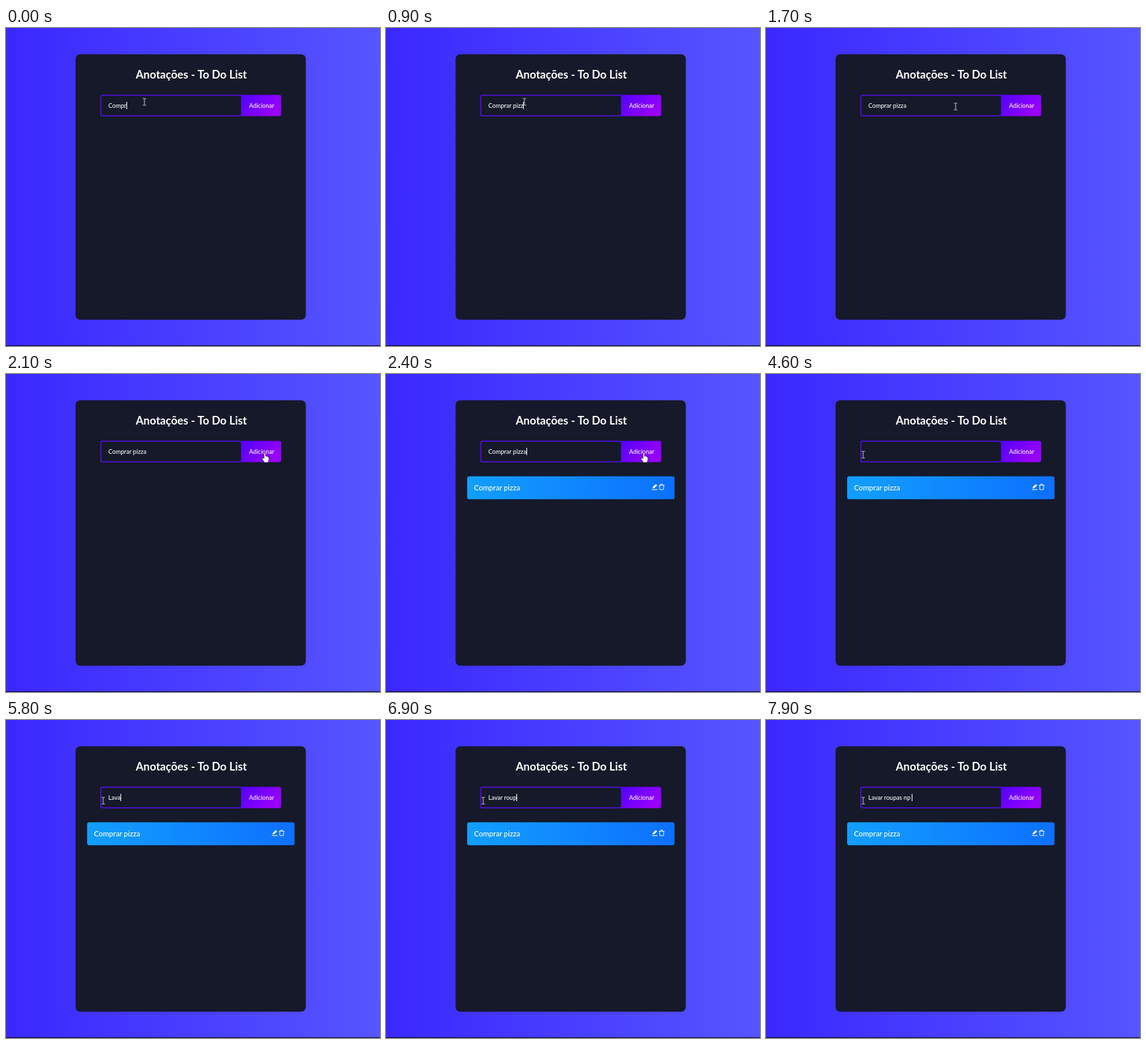
Recreate the animation shown at these times as an HTML page. Size 562 by 478 pixels, loop 8000 ms.

```html
<!DOCTYPE html>
<html lang="pt">
<head>
<meta charset="utf-8">
<title>To Do List</title>
<style>
  html, body { margin: 0; width: 100%; height: 100%; overflow: hidden; background: #3c28ff; }
  svg { display: block; }
  text { font-family: Lato, "Open Sans", sans-serif; font-weight: 500; fill: #fff; white-space: pre; }
</style>
</head>
<body>
<svg width="562" height="478" viewBox="0 0 562 478">
  <defs>
    <linearGradient id="back"><stop stop-color="#3b28ff"/><stop offset="1" stop-color="#5655ff"/></linearGradient>
    <linearGradient id="violet" y2=".5"><stop stop-color="#5200ff"/><stop offset="1" stop-color="#9a00ff"/></linearGradient>
    <linearGradient id="blue"><stop stop-color="#129fff"/><stop offset="1" stop-color="#0d70ff"/></linearGradient>
  </defs>
  <rect width="562" height="478" fill="url(#back)"/>
  <rect y="477" width="562" height="1" fill="#0c0a30"/>
  <rect x="104.5" y="39.5" width="346" height="399" rx="7" fill="#151929"/>
  <text x="195" y="76" style="font-size:16.7px;font-weight:700">Anotações - To Do List</text>

  <path d="M354 100.5h56.5a3 3 0 0 1 3 3v26a3 3 0 0 1-3 3H354z" fill="url(#violet)"/>
  <rect x="142.5" y="101" width="211.5" height="31" rx="2.5" fill="#151929" stroke="#5610e6" stroke-width="1.5"/>
  <text x="365.3" y="120.3" font-size="9">Adicionar</text>
  <rect id="mark" x="153.5" y="111" width="57.5" height="11.5" fill="#0d60d2"/>
  <text id="entry" x="153.8" y="120.3" font-size="9.1"></text>
  <rect id="caret" y="111" width="1" height="11" fill="#fff"/>

  <g id="item">
    <rect x="122" y="153.7" width="311.5" height="34.6" rx="3" fill="url(#blue)"/>
    <text x="132.3" y="175" font-size="11">Comprar pizza</text>
    <path d="M400.6 172l.5-2.6 4.2-4 2.2 2.1-4.3 4zM399.5 173.2h8.3v1h-8.3z" fill="#fff"/>
    <path d="M410 167.3h8.4M412.6 167v-1.3h3.2v1.3M411 167.5l.5 6.3h5.4l.5-6.3" fill="none" stroke="#fff" stroke-width=".9"/>
  </g>

  <path id="beam" d="M-2.5-5H-.6L0-4.5.6-5H2.5M0-4.5V4.5M-2.5 5H-.6L0 4.5.6 5H2.5" fill="none" stroke="#c9cad2"/>
  <path id="arrow" d="M0 0V12L2.8 9.4 4.7 13.6 6.5 12.8 4.7 8.8H8.6z" fill="#fff" stroke="#111" stroke-width=".6"/>
  <path id="hand" d="M-2.2 1V-6.2Q-2.2-7.4-1.1-7.4T0-6.2V-2.6Q1-3.2 1.8-2.2 2.9-2.7 3.5-1.6 5-1.8 5 0V3Q4.6 5 3.7 7H-1.9Q-2.4 5.3-4.8 2.2-5.6.9-4.7.2-3.6-.4-2.2 1z" fill="#fff" stroke="#111" stroke-width=".6"/>
</svg>
<script>
const LOOP = 8000;
const $ = id => document.getElementById(id);
const show = (id, on) => $(id).style.display = on ? "" : "none";

// [first key time, text, number of characters already there]
const phrases = [
  { text: "Comprar pizza", start: 5, keys: [100, 200, 300, 500, 600, 800, 900, 1000], from: 0 },
  { text: "", start: 0, keys: [], from: 4000 },
  { text: "Lavar roupas np ", start: 0, from: 5500,
    keys: [5500, 5600, 5700, 5800, 5900, 6100, 6500, 6700, 6800, 6900, 7000, 7100, 7200, 7300, 7600, 7700] }
];

// [time, x, y, shape]
const moves = [
  [0, 208, 111, "beam"], [1600, 228, 111, "beam"], [1700, 285, 118, "beam"], [1800, 352, 142, "arrow"],
  [1900, 394, 160, "arrow"], [2000, 393, 131, "hand"], [2100, 390, 126, "hand"], [2400, 388.5, 126, "hand"],
  [3300, 270, 119, "beam"], [3400, 190, 120, "beam"], [3500, 146.8, 121, "beam"], [3600, 146, 121.3, "beam"]
];

const caretOff = [[1600, 2400], [2900, 4000], [4600, 5100]];
const latest = (list, t, time) => list.filter(e => time(e) <= t).pop();

function draw(t) {
  const phrase = latest(phrases, t, p => p.from);
  const typed = phrase.start + phrase.keys.filter(k => k <= t).length;
  const entry = $("entry");
  entry.textContent = phrase.text.slice(0, typed);
  $("caret").setAttribute("x", Math.round(153.8 + entry.getComputedTextLength() - .3));
  show("caret", !caretOff.some(([a, b]) => t >= a && t < b));

  const [, x, y, shape] = latest(moves, t, m => m[0]);
  for (const id of ["beam", "arrow", "hand"]) show(id, id === shape);
  $(shape).setAttribute("transform", `translate(${x} ${y})`);

  show("item", t >= 2400);
  const left = Math.max(153.5, x);
  $("mark").setAttribute("x", left);
  $("mark").setAttribute("width", Math.max(0, 211 - left));
  show("mark", t >= 3400 && t < 4000);
}

function tick() {
  draw(Math.floor(performance.now() % LOOP / 100) * 100);
  requestAnimationFrame(tick);
}
tick();
</script>
</body>
</html>
```
